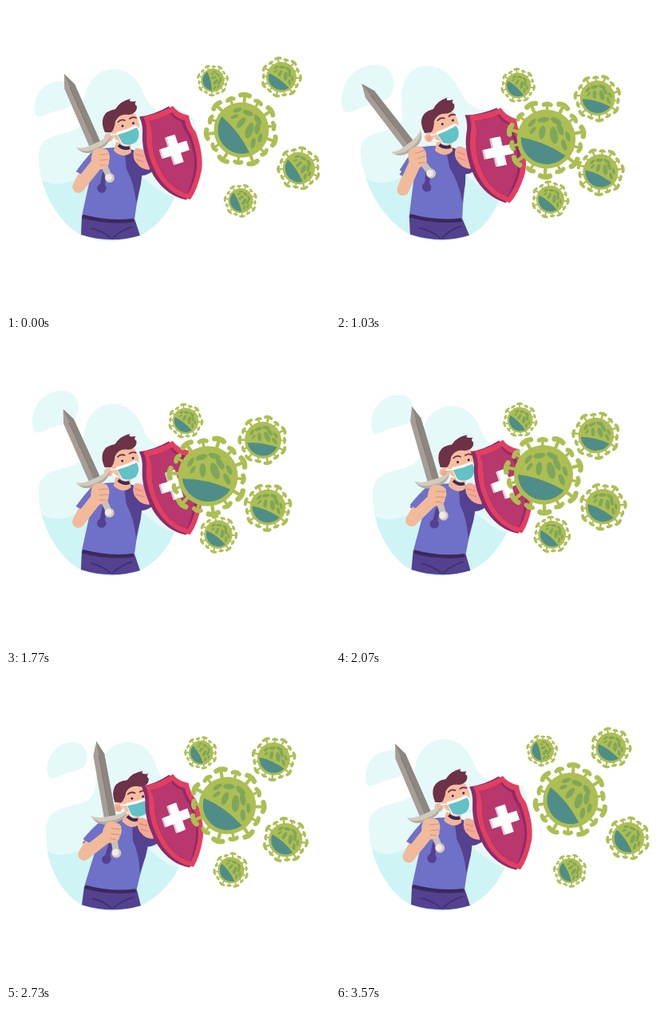
Animation of 406x384 px, one loop 3610 ms. Source, as an HTML page:

```html
<!DOCTYPE html>
<html lang="en">
<head>
<meta charset="utf-8">
<title>Shield against viruses</title>
<style>
html, body { margin: 0; width: 100%; height: 100%; overflow: hidden; background: #fff; }
svg { display: block; width: 406px; height: 384px; }
</style>
</head>
<body>
<svg viewBox="0 0 406 384" xmlns="http://www.w3.org/2000/svg">
  <defs>
    <path id="blobShape" d="M94 286C66 272 40 228 41 186C42 164 62 162 80 157C98 152 99 142 98 126C97 100 112 79 134 79C158 79 168 98 174 113C181 130 199 136 212 133C232 128 243 146 238 168C232 192 219 222 211 240C200 264 186 278 168 287C144 296 116 296 94 286Z"/>
    <clipPath id="blobClip"><use href="#blobShape"/></clipPath>
    <path id="plate" d="M172 138Q190 136 209 125Q215 134 229 137Q230 148 238 158Q248 186 245 206Q240 230 231 242Q206 237 190 212Q175 185 176 161Q177 148 172 138Z"/>
    <path id="cross" d="M-5.500 -18H5.500V-6H17V6H5.500V18H-5.500V6H-17V-6H-5.500Z"/>
    <g id="virus">
      <g id="spikes" fill="none" stroke="#adbe52" stroke-linecap="round"></g>
      <circle r="34.5" fill="#adbe52"/>
      <path d="M-24 -17.500Q-4 0 9 28.500A30 30 0 0 1 -24 -17.500Z" fill="#4f8e88"/>
      <g id="spots" fill="#7fa65d"></g>
    </g>
  </defs>

  <path id="puff" fill="#e5f9f9" d="M6 88C-4 70 2 36 26 15C48 0 76 -3 90 12C106 30 100 60 84 68C66 76 50 76 34 84C22 91 10 93 6 88Z"/>

  <g id="backdrop">
    <use href="#blobShape" fill="#e5f9f9"/>
    <path clip-path="url(#blobClip)" fill="#cff4f5" d="M38 213C55 226 72 224 88 216C118 200 160 204 176 218C190 230 202 238 216 240V300H38Z"/>

    <!-- trousers -->
    <path fill="#54418f" d="M95 262L161 266L168 287Q132 298 94 286Z"/>
    <path d="M107 278Q122 282 131 290M158 276Q143 281 134 290" fill="none" stroke="#3f2d6a" stroke-width="1.6" stroke-linecap="round"/>

    <!-- shirt and belt -->
    <path fill="#54418f" d="M158 180Q174 184 186 206L176 211Q168 214 160 208Z"/>
    <path fill="#6f70c8" d="M136 177Q116 177 107 183Q97 194 88 207Q97 212 106 213Q101 235 95 263Q128 274 161 267Q163 250 167 232Q173 206 164 184Q156 177 136 177Z"/>
    <path fill="#54418f" d="M148 179Q163 177 169 190Q173 213 166 234L163 246Q161 222 151 204Z"/>
    <path d="M120 228L124 208" stroke="#54418f" stroke-width="6"/>
    <circle cx="120" cy="228" r="5.8" fill="#54418f"/>
    <path d="M96 263Q128 272 160 268" fill="none" stroke="#3a2959" stroke-width="4.5"/>
  </g>

  <g id="body">
    <!-- neck and head -->
    <path fill="#f2b596" d="M138 170L156 172L157 183Q147 192 135 181Z"/>
    <path d="M141 174Q148 180 155 177" fill="none" stroke="#3a2959" stroke-width="4"/>
    <g transform="translate(-1 0)">
      <path fill="#f6bd9f" d="M131 150Q134 133 160 132Q169 140 168 156Q165 174 151 175Q136 172 131 150Z"/>
      <path fill="#6d3148" d="M125 158Q120 147 123 139Q126 131 138 129Q144 119 157 116Q153 121 164 119Q161 123 165 125Q166 134 155 136Q143 134 138 144Q137 154 133 158Z"/>
      <circle cx="130" cy="164" r="5.8" fill="#f6bd9f"/>
      <circle cx="130" cy="165" r="3.2" fill="#f3a48f"/>
      <path d="M132 161L142 160M143 170L134 167" stroke="#fff" stroke-width="1.6"/>
      <path fill="#fff" d="M139 158Q151 155 164 149L169 154Q169 166 163 170Q153 177 146 173Z"/>
      <path fill="#62c2c6" d="M141 161Q153 158 165 152Q171 161 164 170Q155 176 147 172Z"/>
      <g id="face">
        <circle cx="147" cy="150" r="1.5" fill="#3a2544"/>
        <circle cx="160.5" cy="146.5" r="1.5" fill="#3a2544"/>
        <path d="M141.500 145Q145 141 150 143M156 141Q160 138 164 140" fill="none" stroke="#6d3148" stroke-width="1.8" stroke-linecap="round"/>
      </g>
    </g>

    <!-- arm with sword -->
    <path d="M102 206Q95 217 91 226" fill="none" stroke="#f0ba9b" stroke-width="15" stroke-linecap="round"/>
    <path fill="#6f70c8" d="M110 181Q97 194 88 207Q98 213 109 213Z"/>
    <g id="arm">
      <path d="M91 226L114 197" stroke="#f0ba9b" stroke-width="15" stroke-linecap="round"/>
      <g transform="translate(113 176.500) rotate(-23.700)">
        <path fill="#a69d96" d="M0 -100L-7 -83L-7.500 -2H7.500L7 -83Z"/>
        <path fill="#8d857f" d="M0 -100L7 -83L7.500 -2H1Z"/>
        <path d="M0 -82V-5" stroke="#7d756f" stroke-width="1"/>
        <rect x="-4" width="8" height="38" fill="#c9c1b7"/>
        <path fill="#d2cabe" d="M-23 -10Q-17 -4 0 -5Q17 -4 23 -10Q22 0 8 4H-8Q-22 0 -23 -10Z"/>
        <path fill="#b4aba1" d="M-21 -5Q-12 2 0 1Q12 2 21 -5Q17 3 7 4H-7Q-17 3 -21 -5Z"/>
        <circle cy="42" r="6" fill="#d2cabe"/>
        <circle cx="-1" cy="41" r="4.2" fill="#f0ece5"/>
      </g>
      <path fill="#f0ba9b" d="M108 184Q110 177 119 178Q128 178 129 184Q131 189 129 194Q130 200 124 202Q115 208 109 201Q105 193 108 184Z"/>
      <path d="M117 186L128 185M118 193L128 192M118 199L125 199" stroke="#d9977e" stroke-width="1.2" stroke-linecap="round"/>
    </g>
  </g>

  <g id="shield">
    <path fill="#f3a995" d="M160 181Q163 176 169 179L180 183V205Q169 204 165 198Q158 192 160 181Z"/>
    <path d="M162 185L172 188M163 192L173 195" stroke="#d98a7c" stroke-width="1.2"/>
    <use href="#plate" x="-5" y=".5" fill="#8b2c6a"/>
    <use href="#plate" fill="#e23f61"/>
    <path fill="#8b2c6a" d="M179 144Q194 142 208 133Q214 141 224 143Q225 152 232 162Q241 187 239 204Q236 222 228 235Q207 229 195 208Q182 185 183 162Q183 151 179 144Z"/>
    <path fill="#b8376c" d="M179 144Q194 142 206 134Q211 142 220 145Q222 154 229 164Q238 188 236 203Q233 221 227 235Q207 229 195 208Q182 185 183 162Q183 151 179 144Z"/>
    <g transform="translate(212 179.500) rotate(-18)">
      <use href="#cross" x="-2.5" fill="#d5cbe0"/>
      <use href="#cross" fill="#fff"/>
    </g>
  </g>

  <g id="swarm"></g>
</svg>
<script>
const NS = 'http://www.w3.org/2000/svg';
const LOOP = 3610;
const TIMES = [0, 570, 1030, 1770, 2370, 3130, 3570];
const $ = id => document.getElementById(id);

function add(parent, tag, attrs) {
  const el = document.createElementNS(NS, tag);
  for (const k in attrs) el.setAttribute(k, attrs[k]);
  return parent.appendChild(el);
}

// smooth periodic curve through one value per entry of TIMES
function curve(vals) {
  const n = vals.length;
  const at = i => TIMES[(i + n) % n] + LOOP * Math.floor(i / n);
  const val = i => vals[(i + n) % n];
  const slope = i => (val(i + 1) - val(i - 1)) / (at(i + 1) - at(i - 1));
  return t => {
    let i = n - 1;
    while (TIMES[i] > t) i--;
    const h = at(i + 1) - at(i), u = (t - at(i)) / h, v = 1 - u;
    return v * v * (1 + 2 * u) * val(i) + u * u * (3 - 2 * u) * val(i + 1)
      + h * u * v * (v * slope(i) - u * slope(i + 1));
  };
}

const lean = curve([0, -.64, -.97, -.03, .92, .69, .03]);
const near = curve([0, .425, .75, 1, .6, .235, .025]);
const early = curve([0, .505, .91, 1, .617, .24, .025]);
const puffX = curve([35, 16, 6, 32, 51, 46, 36]);
const puffY = curve([93, 83, 72, 61, 74, 89, 92]);
const puffW = curve([50, 62, 67, 59, 51, 52, 50]);

for (let i = 0; i < 14; i++) {
  const big = i % 2 === 0, r = big ? 44.5 : 41.5, w = big ? 5.5 : 4;
  const g = add($('spikes'), 'g', { transform: `rotate(${8 + i * 360 / 14})` });
  add(g, 'path', { d: `M0 -32V${-r}`, 'stroke-width': big ? 4 : 3.2 });
  add(g, 'path', { d: `M${-w} ${1.3 - r}Q0 ${-r - 1.3} ${w} ${1.3 - r}`, 'stroke-width': big ? 6 : 5 });
}

// x, y, long radius, short radius, tilt
[[-4, -25, 6, 2.6, -15], [9, -21, 7, 3.2, 24], [-8, -17, 5, 2.2, -18],
 [0, -9, 8, 3.6, -48], [10, 1, 10, 4.6, -68], [21, -12, 7, 3.2, 60],
 [20, -1, 7.5, 3.4, -80], [23, 11, 6, 2.6, -75], [14, 17, 7, 3, -75]
].forEach(([cx, cy, rx, ry, a]) =>
  add($('spots'), 'ellipse', { cx, cy, rx, ry, transform: `rotate(${a} ${cx} ${cy})` }));

const germs = [
  { x: 259, y: 93, dx: -34, dy: 7, s: .425, grow: .11, a: 22, turn: -38, move: early },
  { x: 345, y: 89, dx: -23, dy: 35, s: .55, grow: .21, a: -18, turn: -28, move: near },
  { x: 367, y: 203, dx: -39, dy: 5, s: .585, grow: .11, a: 2, turn: -34, move: early },
  { x: 294, y: 243.5, dx: -28, dy: -1.5, s: .45, grow: .14, a: 12, turn: -30, move: early },
  { x: 295, y: 155, dx: -42, dy: 14, s: 1, grow: .09, a: -2, turn: -40, move: near }
];
for (const g of germs) g.el = add($('swarm'), 'use', { href: '#virus' });

const set = (id, v) => $(id).setAttribute('transform', v);

function draw(t) {
  const m = lean(t), right = m > 0;
  set('puff', `translate(${puffX(t)} ${puffY(t)}) scale(${puffW(t) / 100})`);
  set('backdrop', `translate(0 298) skewX(${-5.3 * m}) scale(1 ${1 - .02 * m}) translate(0 -298)`);
  set('body', `rotate(${5 * m} 130 310)`);
  set('arm', `rotate(${9.5 * m} 91 226)`);
  set('face', `translate(${-m} ${1.5 * m})`);
  set('shield', `translate(${(right ? 2.5 : 8) * m} ${-2.5 * m}) rotate(${(right ? -2.5 : -6) * m} 211 180) `
    + `translate(211 0) scale(${1 - .05 * m} 1) translate(-211 0)`);
  for (const g of germs) {
    const p = g.move(t);
    // the large one sinks faster at first than it drifts
    const q = g.s === 1 ? p * (1.35 - .35 * p) : p;
    g.el.setAttribute('transform',
      `translate(${g.x + g.dx * p} ${g.y + g.dy * q}) rotate(${g.a + g.turn * p}) scale(${g.s * (1 + g.grow * p)})`);
  }
}

const start = performance.now();
function tick() {
  draw((performance.now() - start) % LOOP);
  requestAnimationFrame(tick);
}
tick();
</script>
</body>
</html>
```
